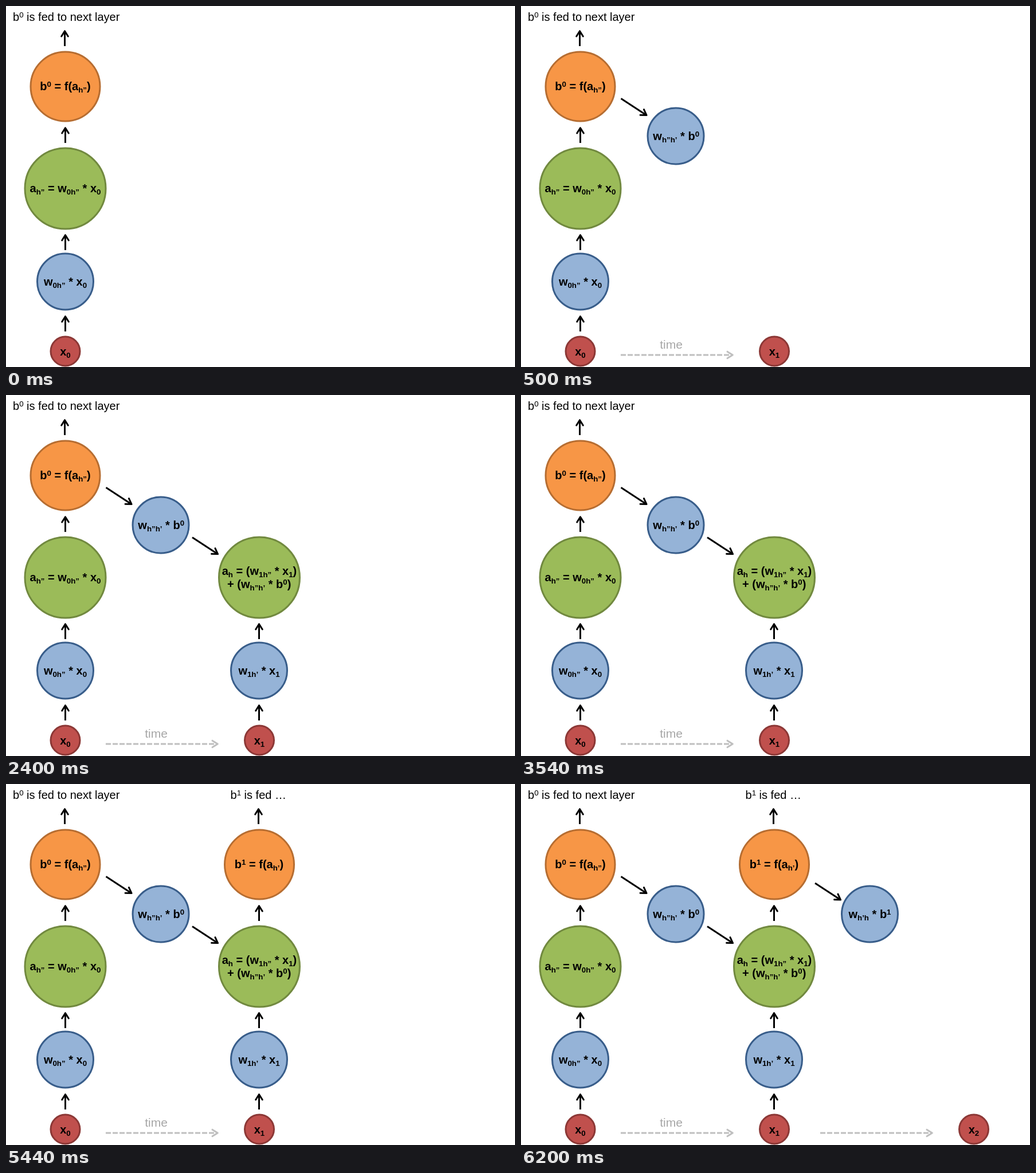
Write an HTML page that moves like this. It is 888x630 px and loops after 8000 ms.

```html
<!DOCTYPE html>
<html lang="en">
<head>
<meta charset="utf-8">
<title>Recurrent network unrolled over time</title>
<style>
html, body { margin: 0; width: 100%; height: 100%; overflow: hidden; background: #fff; }
svg { display: block; width: 888px; height: 630px; }
text { font: bold 20px "Liberation Sans", Arial, sans-serif; text-anchor: middle; white-space: pre; }
.small { font-size: 13.3px; }
.caption { font-weight: normal; text-anchor: start; }
.time { font-weight: normal; font-size: 21px; fill: #a6a6a6; }
circle { stroke-width: 3; }
.red { fill: #c0504d; stroke: #8c3836; }
.blue { fill: #95b3d7; stroke: #385d8a; }
.green { fill: #9bbb59; stroke: #71893f; }
.orange { fill: #f79646; stroke: #b66d31; }
.arrow { fill: none; stroke: #000; stroke-width: 3; stroke-linejoin: round; }
.head { stroke-linecap: round; }
.axis { stroke: #bfbfbf; }
.axis .shaft { stroke-dasharray: 9 3; }
.step { animation: 8s step-end infinite; }
#step1 { animation-name: show1; }
#step2 { animation-name: show2; }
#step3 { animation-name: show3; }
#step4 { animation-name: show4; }
@keyframes show1 { 0% { visibility: hidden; } 6.25%, 100% { visibility: visible; } }
@keyframes show2 { 0% { visibility: hidden; } 30%, 100% { visibility: visible; } }
@keyframes show3 { 0% { visibility: hidden; } 53.75%, 100% { visibility: visible; } }
@keyframes show4 { 0% { visibility: hidden; } 77.5%, 100% { visibility: visible; } }
</style>
</head>
<body>
<svg viewBox="0 0 888 630">
  <g id="step0"></g>
  <g id="step1" class="step"></g>
  <g id="step2" class="step"></g>
  <g id="step3" class="step"></g>
  <g id="step4" class="step"></g>
</svg>
<script>
const radius = { red: 25.5, blue: 49, green: 70.5, orange: 60.5 };

// Label markup: _{…} is subscript, ^{…} is superscript.
function label(x, y, str, cls = "") {
  let back = 0;
  const spans = str.split(/([_^]\{.+?\})/).filter(Boolean).map(part => {
    const shift = part[0] === "_" ? 4 : part[0] === "^" ? -6 : 0;
    const dy = shift - back;
    back = shift;
    return shift
      ? `<tspan class="small" dy="${dy}">${part.slice(2, -1)}</tspan>`
      : `<tspan dy="${dy}">${part}</tspan>`;
  });
  return `<text class="${cls}" x="${x}" y="${y}">${spans.join("")}</text>`;
}

const node = (kind, x, y, str = "", dx = 0, dy = 6.5) =>
  `<circle class="${kind}" cx="${x}" cy="${y}" r="${radius[kind]}"/>` +
  (str && label(x + dx, y + dy, str));

function arrow(x1, y1, x2, y2, cls = "") {
  const len = Math.hypot(x2 - x1, y2 - y1);
  const turn = Math.atan2(y2 - y1, x2 - x1) * 180 / Math.PI;
  return `<g class="arrow ${cls}" transform="translate(${x1} ${y1}) rotate(${turn})">` +
    `<path class="shaft" d="M0 0H${len - 2}"/>` +
    `<path class="head" d="M${len - 11} -5.8L${len - 1.7} 0L${len - 11} 5.8"/></g>`;
}

const up = (x, y) => arrow(x, y + 28, x, y);
const down = (x, y) => arrow(x, y, x + 46, y + 30);
const axis = x => arrow(x, 609, x + 197, 609, "axis");

const steps = [
  [
    label(12, 26, "b^{0} is fed to next layer", "caption"),
    up(102.5, 42), up(103.5, 211), up(103.5, 398), up(103.5, 540),
    node("orange", 103.5, 140.5, "b^{0} = f(a_{h”})"),
    node("green", 103.5, 318.5, "a_{h”} = w_{0h”} * x_{0}"),
    node("blue", 103.5, 481, "w_{0h”} * x_{0}"),
    node("red", 103.5, 602.5, "x_{0}", 0, 7.5)
  ],
  [
    down(174.5, 161.5),
    node("blue", 270, 227, "w_{h”h’} * b^{0}", 0.7),
    label(262, 598, "time", "time"),
    axis(174),
    node("red", 442, 602.5, "x_{1}", 0, 7.5)
  ],
  [
    down(325, 248.5),
    node("green", 442, 318.5),
    label(442, 314, "a_{h} = (w_{1h”} * x_{1})"),
    label(441.7, 337, "+ (w_{h”h’} * b^{0})"),
    up(441.5, 398), up(441.5, 540),
    node("blue", 441.5, 481, "w_{1h’} * x_{1}")
  ],
  [
    label(391.5, 26, "b^{1} is fed …", "caption"),
    up(440.5, 42), up(441.5, 211),
    node("orange", 442, 140.5, "b^{1} = f(a_{h’})", -0.5)
  ],
  [
    down(513, 173),
    node("blue", 608.5, 227, "w_{h’h} * b^{1}"),
    axis(522),
    node("red", 790, 602.5, "x_{2}", 0, 7.5)
  ]
];

steps.forEach((parts, i) => {
  document.getElementById("step" + i).innerHTML = parts.join("");
});
</script>
</body>
</html>
```
